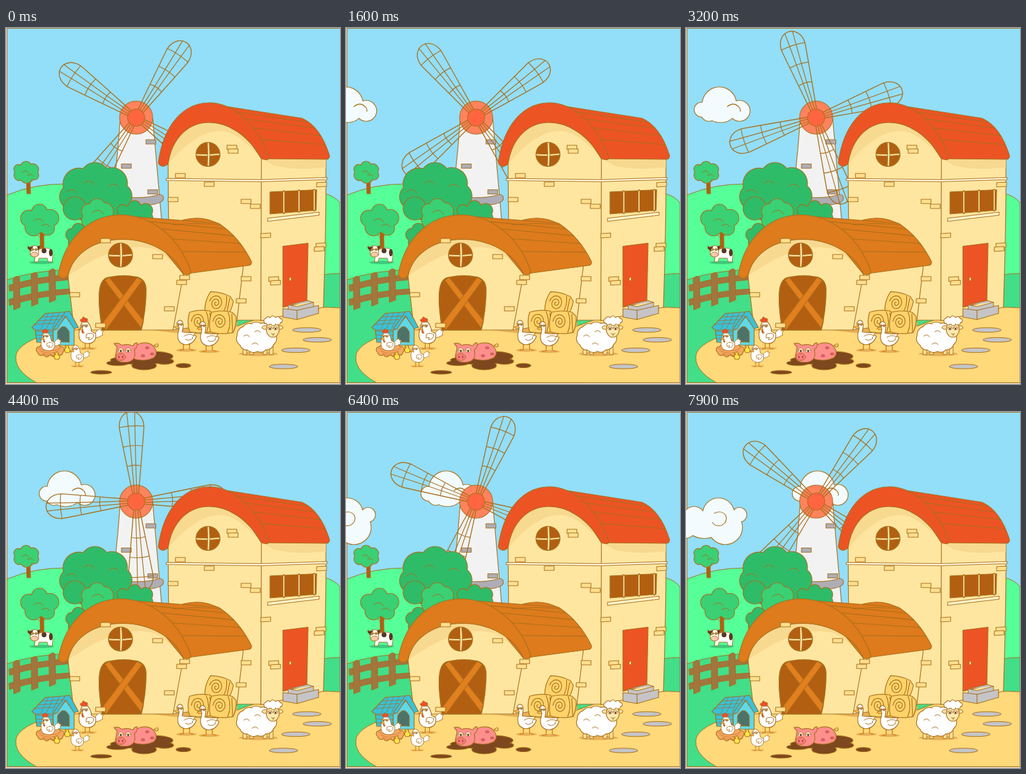
Recreate the animation shown at these times as an HTML page with a canvas. Size 544 by 580 pixels, loop 8 s.

```html
<!DOCTYPE html>
<html lang="en">
<head>
<meta charset="utf-8">
<title>Farm</title>
<style>
html, body { margin: 0; width: 544px; height: 580px; overflow: hidden; background: #fff; }
canvas { display: block; }
</style>
</head>
<body>
<canvas id="stage" width="544" height="580"></canvas>
<script>
const LOOP = 8000, STEP = 100, TAU = Math.PI * 2;
const SPIN = 0.012, DRIFT = 0.034; // degrees and pixels per ms
const c = document.getElementById('stage').getContext('2d');

const LINE = '#a86f1c', WALL = '#ffe6a0', SHADE = '#f8d990', SAND = '#ffd97a';
const RED = '#ec5424', ORANGE = '#de7b1c', WOOD = '#b35f12', CREAM = '#ffe9a8';
const LEAF = '#2fbc69', LEAF2 = '#3ad074', GREY = '#c5c4c6', SLATE = '#aeadb5';
const PINK = '#ff8f8c', MUD = '#7d481e', BLUE = '#38c2da', SHADOW = '#e5b058';

const lerp = (a, b, k) => a + (b - a) * k;
const mix = (p, q, k) => [lerp(p[0], q[0], k), lerp(p[1], q[1], k)];

function path(d, fill, width = 1.2, line = LINE) {
  const p = new Path2D(d);
  if (fill) { c.fillStyle = fill; c.fill(p); }
  if (width) { c.strokeStyle = line; c.lineWidth = width; c.stroke(p); }
}
function oval(x, y, rx, ry, fill, width = 1.1) {
  c.beginPath();
  c.ellipse(x, y, rx, ry, 0, 0, TAU);
  if (fill) { c.fillStyle = fill; c.fill(); }
  if (width) { c.strokeStyle = LINE; c.lineWidth = width; c.stroke(); }
}
const poly = (points, ...style) => path('M' + points.join('L') + 'Z', ...style);

// Merged ovals with one shared outline
function puff(ovals, fill) {
  for (const [edge, color] of [[.6, LINE], [-.6, fill]])
    for (const [x, y, rx, ry = rx] of ovals) oval(x, y, rx + edge, ry + edge, color, 0);
}
// Lobes set around an oval
function crown(x, y, rx, ry, n, fill, turn = -1.6) {
  const lobes = [[x, y, rx * .72, ry * .72]];
  for (let i = 0; i < n; i++) {
    const a = turn + i * TAU / n, r = Math.min(rx, ry) * (.48 + .06 * Math.sin(i * 2.3));
    lobes.push([x + Math.cos(a) * (rx - r), y + Math.sin(a) * (ry - r), r]);
  }
  puff(lobes, fill);
}
function at(x, y, draw, scale = 1, turn = 0) {
  c.save(); c.translate(x, y); c.rotate(turn); c.scale(scale, scale); draw(); c.restore();
}
const curl = (x, y, s) => path(`M${x} ${y}q${s} ${-s * .8} ${s * 1.6} ${s * .2}`, null, 1);

function bricks(points, rise = 0, fill = '#ffdf8e') {
  for (const [x, y] of points) path(`M${x} ${y}l16 ${-rise}v7l-16 ${rise}z`, fill, 1.1);
}

function sky() {
  c.fillStyle = '#fff';
  c.fillRect(0, 0, 544, 580);
  c.fillStyle = '#93def9';
  c.fillRect(1.5, 0, 542.5, 578);
  path('M544 .5H1.5V578', null);
}

function clouds(t) {
  const white = '#f3fbff';
  at(t * DRIFT - 108.5, 0, () => {
    puff([[54, 124, 28], [25, 133, 12], [87, 135, 17], [56, 140, 22, 14], [37, 139, 13]], white);
    path('M67 128q10 -8 18 0q4 3 3 8', null);
  });
  at(t * DRIFT - 268.6, 0, () => {
    puff([[53, 166, 26], [13, 173, 19], [-2, 186, 20], [87, 167.5, 12], [64, 188, 28], [30, 188, 28, 18]], white);
    path('M46 165q12 -6 19 4q3 11 -8 16q-9 2 -14 -5', null);
  });
}

function land() {
  path('M2 272Q45 254 96 254Q190 265 250 350L480 270H520Q536 274 544 285V578H2Z', '#56ff98', 1);
  path('M2 410Q50 394 106 394L300 430L515 402Q530 400 544 400V578H2Z', '#43de88', 1);
  path('M50 578Q10 556 17 530Q28 504 112 488H370Q470 449 544 456V578Z', SAND, 1);
}

function smallTree(x, y, rx, ry, foot, n) {
  path(`M${x} ${y}L${x + 1} ${foot}h6L${x + 6} ${y}M${x + 1} ${y + ry}l-${rx / 2} -${ry / 2}M${x + 5} ${y + ry}l${rx / 2} -${ry / 2}`, WOOD, 1);
  crown(x, y, rx, ry, n, LEAF2);
  curl(x - rx * .3, y, rx * .3);
  curl(x + rx * .1, y + ry * .3, rx * .25);
}

function fence() {
  const wood = '#a1763f';
  for (const y of [419, 442]) path(`M5 ${y}Q55 ${y - 15} 105 ${y - 17}l1 8Q55 ${y - 6} 6 ${y + 10}Z`, wood, 1);
  for (let i = 0; i < 3; i++)
    path(`M${12 + 29 * i} ${408 - 6 * i}q5 -6 10 -2l1 49l-10 4z`, wood, 1);
}

// Half closed pair of eyes
function eyes(x, y, gap, r) {
  for (const ex of [x, x + gap]) {
    oval(ex, y, r, r * .8, '#fff', .8);
    path(`M${ex - r} ${y - .4}h${r * 2}`, null, 1);
    oval(ex, y + r * .35, r * .35, r * .35, '#543211', 0);
  }
}

function cow() {
  const patch = '#563922';
  oval(58, 382, 20, 2.8, '#3dc97b', 0);
  path('M48 362q12 -4 22 -3q9 4 5 22h-6l-2 -6h-13l-2 6h-5z', '#fff', 1);
  oval(62, 363, 4, 4, patch, 0);
  oval(73, 366, 3, 6, patch, 0);
  path('M39 357q8 -5 14 0v13q-7 6 -13 0z', '#fff', 1);
  path('M38 357q-4 -4 -2 3l5 4l3 -8zM51 356l6 -2l-4 9z', patch, .8);
  eyes(43, 361, 6, 2.3);
  oval(46.5, 369, 6, 4, '#ffc9ac', .9);
}

function tower() {
  path('M186 148Q212 110 239 148L254 320H166Q179 250 186 148Z', '#f2f2f2');
  bricks([[188, 221.5], [231, 263.5], [228, 182]], 0, SLATE);
  path('M202 276Q229 278 250 271q8 1 6 9q-4 6 -20 8h-34z', SLATE);
}

function blade() {
  const half = r => lerp(6, 20, (r - 28) / 92);
  const w = half(120);
  path(`M-5 -14L-7 -28Q-14 -76 ${-w} -120C${-w - 1} -138 -10 -147 0 -147C10 -147 ${w + 1} -138 ${w} -120Q14 -76 7 -28L5 -14`, null, 1.4);
  for (const side of [-1, 1]) path(`M${side * 2} -14Q${side * 3} -70 ${side * 6.5} -146`, null, 1.2);
  for (const r of [58, 90, 122]) path(`M${-half(r)} ${-r}q${half(r)} -3 ${half(r) * 2} 0`, null, 1.2);
}

function mill(t) {
  oval(212, 146, 27, 27, '#ff835d');
  for (let i = 0; i < 4; i++) at(212, 146, blade, 1, (33.7 + t * SPIN + i * 90) / 360 * TAU);
  oval(212, 146, 14, 14, '#ff6540');
}

function bigTree() {
  crown(146, 268, 60, 49, 7, LEAF);
  puff([[112, 294, 19]], LEAF);
  for (const [x, y] of [[127, 253], [167, 258], [98, 267]]) curl(x, y, 11);
  crown(210, 303, 32, 22, 6, LEAF);
  crown(118, 340, 21, 22, 5, LEAF);
  crown(149, 306, 28, 28, 6, LEAF2);
  curl(140, 301, 12);
}

function roundWindow(x, y) {
  oval(x, y, 19.5, 19.5, WOOD, 1.5);
  path(`M${x - 19} ${y - 1}q19 2 38 -1v3q-19 3 -38 1z`, CREAM, .9);
  path(`M${x - 1} ${y - 19}q1 19 0 38h3q2 -19 0 -38z`, CREAM, .9);
}

// Arch: start, end, the two control columns and their shared height
const archTo = a => `C${a.p} ${a.lift} ${a.q} ${a.lift} ${a.to}`;
const archBack = a => `C${a.q} ${a.lift} ${a.p} ${a.lift} ${a.from}`;
function archPoint(a, k) {
  const ab = mix(a.from, [a.p, a.lift], k), bc = mix([a.p, a.lift], [a.q, a.lift], k);
  const cd = mix([a.q, a.lift], a.to, k);
  return mix(mix(ab, bc, k), mix(bc, cd, k), k);
}

function archRoof(outer, inner, ridge, bend, eave, start, planks, fill) {
  const near = archPoint(outer, start);
  path(`M${near}L${ridge}Q${bend} ${eave}q0 6 -6 6L${inner.to}Z`, fill);
  for (let i = 1; i <= planks; i++) {
    const k = i / (planks + 1);
    const far = mix(mix(ridge, bend, k), mix(bend, eave, k), k);
    path(`M${archPoint(outer, lerp(start, .98, k))}L${far}`, null, 1.1);
  }
  path(`M${outer.from}${archTo(outer)}Q${mix(outer.to, inner.to, .4).map(v => v + 6)} ${inner.to}${archBack(inner)}q-10 9 ${outer.from[0] - inner.from[0]} ${outer.from[1] - inner.from[1]}Z`, fill);
}

function archFace(inner, left, right, ground) {
  path(`M${inner.from}${archTo(inner)}L${right} ${ground}H${left}Z`, WALL);
  path(`M${inner.from}${archTo(inner)}q-26 -30 -46 -40Q${(inner.p + inner.q) / 2} ${inner.lift + 18} ${inner.from}Z`, SHADE, 0);
}

function tallBarn() {
  const outer = { from: [248, 220], to: [428, 210], p: 265, q: 385, lift: 91 };
  const inner = { from: [264, 221], to: [416, 213], p: 278, q: 372, lift: 133 };
  path('M415 205L521 208Q522 300 517 455L415 477Z', WALL);
  path('M415 211H521V227Q470 233 436 224Z', SHADE, 0);
  archFace(inner, 266, 415, 476);
  archRoof(outer, inner, [482, 147], [512, 160], [527, 208], .64, 4, RED);

  poly([[261, 245], [415, 247], [523, 243.5], [523, 247], [415, 250.5], [261, 248.5]], '#fff7de', 1.1);
  roundWindow(329, 206);
  poly([[430, 267], [506, 263.5], [505, 297], [430, 303]], WOOD);
  for (const k of [.3, .63, .96]) {
    const x = lerp(430, 505, k);
    path(`M${x} ${lerp(267, 263.5, k)}V${lerp(303, 297, k)}`, null, 3.4);
    path(`M${x} ${lerp(268, 264.5, k)}V${lerp(302, 296, k)}`, null, 1.6, CREAM);
  }
  poly([[426, 310], [510, 300], [510, 305], [426, 315]], '#fff3c8', 1.1);
  bricks([[360, 191], [362, 197], [276, 237], [323, 251], [264, 276], [383, 279], [398, 287]]);
  bricks([[415, 335], [428, 406], [431, 412], [505, 351], [502, 357], [506, 252]], 1);

  poly([[451, 355.5], [492, 350.5], [490, 446], [451, 455]], RED);
  oval(463, 409, 2, 3, '#ffe18d', 1);
  path('M460 451l31 -7l10 3v13h-41zM460 451l14 3l27 -7', GREY, 1);
  path('M451 457l23 3l35 -8v13l-35 10l-23 -4zM474 460v15', GREY);
}

function smallBarn() {
  const outer = { from: [85, 402], to: [301, 396], p: 108, q: 258, lift: 273 };
  const inner = { from: [101, 404], to: [289, 401], p: 118, q: 255, lift: 325 };
  path('M282 392L388 376Q382 425 376 478L272 492Z', WALL);
  archFace(inner, 111, 272, 492);
  path('M270 320Q310 300 347 319L300 350L240 330Z', ORANGE);
  archRoof(outer, inner, [346, 318], [380, 340], [400, 381], .6, 4, ORANGE);
  path('M270 321Q310 316 350 321', null, 1.1);
  roundWindow(186.5, 370);

  const door = 'M157 492Q149 445 153 424Q156 407 169 406Q192 401 214 406Q228 410 228 427Q228 460 220 492Z';
  path(door, WOOD);
  poly([[161, 411], [168, 406], [224, 477], [221, 490]], '#e27f1e', 1.1);
  poly([[214, 406], [222, 411], [163, 492], [155, 484]], '#e27f1e', 1.1);
  path(door, null, 1.5);
  bricks([[154, 343], [239, 369], [258, 454], [104, 431], [146, 481], [283, 403], [278, 411], [383, 405], [375, 441]]);
}

function hayRoll(x, y, turn) {
  at(x, y, () => {
    path('M-17 -15q16 -5 33 -2l7 6q2 13 -3 27l-9 2q-16 2 -28 -1q-5 -16 0 -32zM10 -16q7 16 1 33M16 -14l3 29', '#ffd36a');
    let d = 'M-14 0';
    for (let i = 1; i <= 36; i++) {
      const a = i / 36 * TAU * 2.2, r = 1 - i / 40;
      d += `L${-3 - Math.cos(a) * 11 * r} ${-Math.sin(a) * 13 * r}`;
    }
    path(d, null);
  }, 1, turn);
}

function coop() {
  path('M47 487h31l-2 26l-26 -1z', BLUE);
  path('M77 489l17 -23l17 23v28h-34z', '#5fd8e8');
  path('M42 488l22 -23l40 -3l-24 30l-32 0z', BLUE);
  path('M97 462h7l14 26l-7 2l-14 -21l-14 22l-6 -1z', BLUE);
  for (let i = 1; i < 4; i++) {
    path(`M${64 - i * 6} ${465 + i * 6}l${38 - i * 2} -2M${60 + i * 9} ${465 - i * .6}l-12 26`, null, .8);
    path(`M48 ${488 + i * 6}l29 1`, null, .8);
  }
  path('M84 511v-16q10 -17 19 0v17z', '#4d7368');
}

function hen(x, y, scale, comb, legs) {
  at(x, y, () => {
    if (legs) {
      oval(2, 26, 15, 2, SHADOW, 0);
      path('M-2 17v9l-5 1M5 17v9l5 1', null, 1.7, '#d98a27');
    }
    path('M13 3q5 -9 12 -9q-4 4 3 3q-4 5 -1 7q-7 5 -15 5z', '#fff', 1);
    path('M-9 -12q3 -10 11 -5q6 7 6 15l7 4q2 16 -13 16q-16 -1 -14 -18z', '#fff');
    path('M0 3q7 -4 12 1q-1 8 -9 8l2 -4l-5 1z', '#fff', 1);
    if (comb) path('M-8 -17q-5 -4 1 -5q1 -6 5 -1q6 -1 3 6zM-7 -5q-2 8 3 6z', '#ed4e2c', .9);
    eyes(-7, -11, 6.5, 3);
    path('M-7 -8l-7 3l8 1z', '#ffba3c', .9);
  }, scale);
}

function chick(x, y) {
  puff([[x, y + 3, 4.5, 4], [x - 1, y - 2, 3]], '#ffe34b');
  oval(x - 2, y - 2, .8, .8, '#543211', 0);
}

function poultry() {
  hen(131, 496, 1, true, true);
  crown(72, 525, 23, 11, 9, '#f4a960');
  hen(67, 511, .83, true, false);
  for (let i = 0; i < 3; i++) path(`M${53 + i * 3} ${522 + i * 4}q18 8 ${36 - i * 6} 0`, null, .9, '#cf7c34');
  chick(83, 533);
  chick(100, 522);
  hen(115, 531, .77, false, true);
}

function goose(x, y) {
  at(x, y, () => {
    oval(2, 25, 17, 2.5, SHADOW, 0);
    path('M-3 14v10l-6 1M7 14v9l6 2', null, 1.8, '#dc8b28');
    path('M-14 -18q3 -9 9 -4q3 5 0 17q7 2 22 1l-3 4l4 2q-4 13 -17 14q-15 -2 -13 -18q3 -8 1 -12z', '#fff');
    path('M-2 2q7 -5 16 -1q-4 3 -2 5q-7 5 -12 1', '#fff', 1);
    path('M-12 -15l-6 2q2 4 8 2z', '#ffb947', .9);
    eyes(-11, -17, 4.5, 2.1);
  });
}

function pig() {
  puff([[218, 541, 48, 7], [225, 550, 20, 7], [240, 535, 32, 8], [182, 546, 18, 4], [258, 543, 15, 5]], MUD);
  puff([[155, 561, 17, 3]], MUD);
  puff([[289, 550, 12, 3.5]], MUD);
  path('M205 538q-1 -19 13 -24q17 -4 24 7q6 9 -1 16q-17 8 -36 1z', PINK);
  path('M241 518q7 -7 7 0q-5 4 -6 -2', null, 1.1);
  for (const [x, y] of [[230, 521], [223, 534], [238, 531]]) oval(x, y, 3.5, 2.5, '#d3635c', 0);
  path('M181 520l-5 -6q8 -2 12 3q10 -3 18 1q6 -8 8 -4q0 7 -5 10q4 17 -10 20q-19 3 -21 -9z', PINK);
  eyes(187, 525, 12, 4.2);
  oval(187, 536, 8, 5.5, '#ff7e7e', 1);
  for (const x of [184, 190]) oval(x, 536, 1.2, 2, '#a94641', 0);
}

function sheep() {
  oval(411, 531, 32, 3.5, SHADOW, 0);
  for (const x of [386, 397, 419, 429]) path(`M${x} 518v14h6v-14z`, '#ffe09a', 1);
  crown(408, 504, 33, 25, 11, '#fff');
  for (const [x, y] of [[387, 502], [401, 515], [405, 495]]) curl(x, y, 6);
  oval(422, 488, 5, 3, '#ffe3a2');
  oval(446, 488, 5, 3, '#ffe3a2');
  oval(434.5, 491, 10.5, 13, '#ffe8ae');
  crown(435, 477, 15, 8, 8, '#fff');
  eyes(430, 489, 9, 3.6);
  path('M432 498q3 2 6 0M435 499v3', null, 1);
}

function scene(t) {
  c.lineJoin = c.lineCap = 'round';
  sky();
  clouds(t);
  land();
  smallTree(33, 235, 22, 18, 270, 6);
  smallTree(55, 314, 32, 27, 362, 5);
  cow();
  fence();
  tower();
  mill(t);
  bigTree();
  tallBarn();
  path('M238 492Q280 489 378 479L372 494Q320 505 238 492Z', SHADOW, 0);
  smallBarn();
  hayRoll(345, 449, .3);
  hayRoll(316, 478, 0);
  hayRoll(351, 479, .06);
  coop();
  poultry();
  pig();
  goose(292, 500);
  goose(329, 502);
  for (const [x, y] of [[490, 492], [507, 508], [472, 525], [452, 551.5]]) oval(x, y, 23, 3.8, GREY);
  sheep();
  c.fillStyle = '#fff';
  c.fillRect(0, 578.6, 544, 2);
  path('M1 578H544', null);
}

function frame(now) {
  scene(Math.floor((now % LOOP) / STEP) * STEP);
  requestAnimationFrame(frame);
}
scene(0);
requestAnimationFrame(frame);
</script>
</body>
</html>
```
